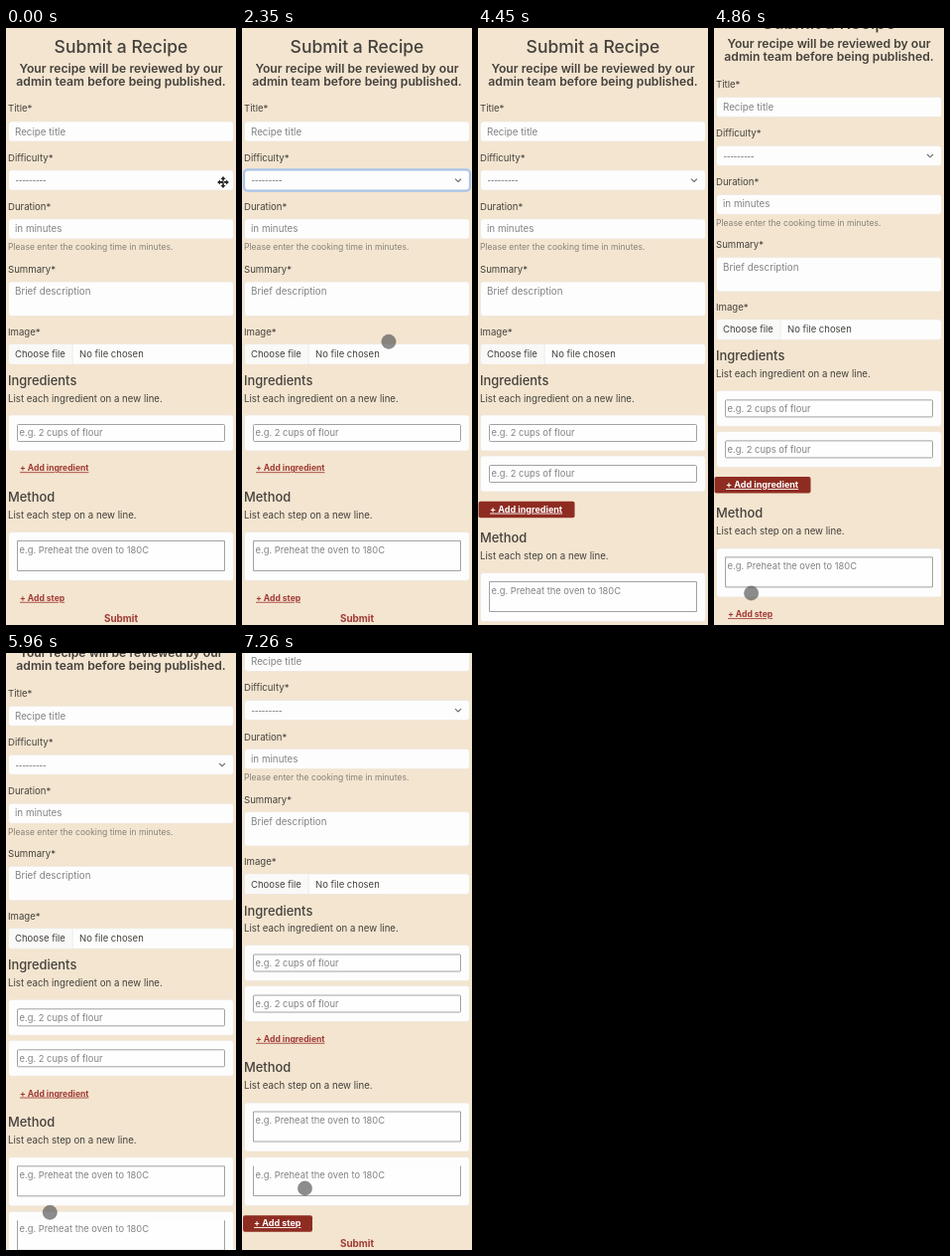
Recreate the animation shown at these times as an HTML page. Size 232 px wide and 600 px high, loop 7360 ms.

```html
<!DOCTYPE html>
<html lang="en">
<head>
<meta charset="utf-8">
<title>Submit a Recipe</title>
<style>
  html, body { margin: 0; width: 100%; height: 100%; overflow: hidden; background: #f3e5d0; }
  svg { display: block; width: 232px; height: 600px; }
  text { font-family: Inter, "Open Sans", sans-serif; fill: #45413c; white-space: pre; }
  .title { font-size: 17.5px; font-weight: 550; text-anchor: middle; }
  .lead { font-size: 12.2px; font-weight: 600; text-anchor: middle; }
  .section { font-size: 12.9px; font-weight: 550; }
  .label { font-size: 9.6px; }
  .body { font-size: 9.7px; }
  .value { font-size: 9.5px; }
  .hint { font-size: 9.8px; fill: #828385; }
  .example { font-size: 9.4px; fill: #828385; }
  .help { font-size: 8.57px; fill: #868077; }
  .dashes { font-family: "Open Sans", sans-serif; font-size: 10.7px; fill: #77797c; }
  .link { font-size: 8.55px; font-weight: 700; fill: #a03a34; text-decoration: underline; }
  .hot { font-size: 9px; font-weight: 700; fill: #fff; text-decoration: underline; }
  .submit { font-size: 9.9px; font-weight: 700; fill: #a03a34; text-anchor: middle; }
  .option { font-size: 6.4px; font-weight: 600; fill: #45423f; }
</style>
</head>
<body>
<svg id="stage" viewBox="0 0 232 600"></svg>
<script>
const LOOP = 7360;
const CARD_GAP = 41, STEP_GAP = 54.5;
const BLUR_AT = 3800, ADD_ITEM_AT = 3820, ADD_STEP_AT = 5700;
const MENU_OPEN = 900, MENU_CLOSE = 1700;

const text = (cls, x, y, value) => `<text class="${cls}" x="${x}" y="${y}">${value}</text>`;
const box = (x, y, w, h, attrs) => `<rect x="${x}" y="${y}" width="${w}" height="${h}" ${attrs}/>`;
const field = (y, h) => box(2.5, y, 227, h, 'rx="3" fill="#fdfdfd" stroke="#ece5da" stroke-width=".7"');
const group = (id, content) => `<g id="${id}">${content}</g>`;
const outlineStyle = 'fill="#fefefe" stroke="#98989a" stroke-width=".9"';

const itemCard = y => field(y, 36)
  + box(11.5, y + 9.5, 209, 17, `rx="1" ${outlineStyle}`)
  + text('example', 13.5, y + 21.3, 'e.g. 2 cups of flour');

function stepCard(y, open) {
  const top = y + 9, bottom = y + 39;
  const outline = `M11.5 ${top}V${bottom}H220.5V${top}${open ? '' : 'Z'}`;
  return field(y, 49)
    + `<path d="${outline}" ${outlineStyle}/>`
    + text('example', 13.5, y + 21, 'e.g. Preheat the oven to 180C');
}

const addLink = (id, label, y, x, w) =>
  group(id + 'Plain', text('link', 14, y + 2.8, label))
  + group(id + 'Hot', box(x, y - 7.8, w, 16.5, 'rx="2" fill="#8f2c22"') + text('hot', 12, y + 3.1, label));

const header = text('title', 116, 25.2, 'Submit a Recipe')
  + text('lead', 116, 44.6, 'Your recipe will be reviewed by our')
  + text('lead', 116, 58, 'admin team before being published.');

const details = text('label', 2, 84.3, 'Title*') + field(94, 20) + text('hint', 9, 107.5, 'Recipe title')
  + text('label', 2, 133.7, 'Difficulty*') + field(143, 20)
  + box(2, 142.4, 228, 21.2, 'id="ring" rx="3.5" fill="none" stroke="#a9c5ea" stroke-width="2.2"')
  + text('dashes', 9.5, 156.3, '---------')
  + '<path id="chevron" d="M215 151.6l3 2.8l3-2.8" fill="none" stroke="#66696e" stroke-width="1.1"/>'
  + text('label', 2, 183, 'Duration*') + field(192, 20) + text('hint', 9, 205, 'in minutes')
  + text('help', 2, 223.3, 'Please enter the cooking time in minutes.')
  + text('label', 2, 246.1, 'Summary*') + field(255, 34.5) + text('hint', 9, 268.2, 'Brief description')
  + text('label', 2, 308.5, 'Image*') + field(317.5, 20.5)
  + box(3, 318, 64, 19.5, 'rx="2.5" fill="#f9f9f8"') + box(66.7, 318, .7, 19.5, 'fill="#e6e4e1"')
  + text('value', 9, 331, 'Choose file') + text('value', 74, 331, 'No file chosen');

const ingredients = text('section', 2, 359.1, 'Ingredients')
  + text('body', 2, 375.6, 'List each ingredient on a new line.')
  + itemCard(389) + group('newItem', itemCard(389 + CARD_GAP));

const method = addLink('item', '+ Add ingredient', 442.5, .5, 97)
  + text('section', 2, 475.8, 'Method')
  + text('body', 2, 492.8, 'List each step on a new line.')
  + stepCard(506.5, false) + group('newStep', stepCard(506.5 + STEP_GAP, true));

const footer = addLink('step', '+ Add step', 573, 1, 70) + text('submit', 116, 596.8, 'Submit');

const menu = box(-8, 63, 158, 76, 'rx="5" fill="#6b5a40" opacity=".4" filter="url(#soft)"')
  + box(-8, 60.5, 156.5, 76, 'rx="4" fill="url(#glass)" stroke="#cfc8be" stroke-width=".6"')
  + box(-8, 64, 153, 17.5, 'rx="3" fill="url(#blue)"')
  + '<path d="M0 73l2 2.6l4-6" fill="none" stroke="#fff" stroke-width="1.3"/>'
  + '<path d="M11.5 71h24" stroke="#fff" stroke-width=".8" stroke-dasharray="1.8 .9" opacity=".8"/>'
  + ['Easy peasy', 'Medium rare', 'Hard boiled'].map((name, i) => text('option', 11, 89.2 + 17.2 * i, name)).join('');

const arrows = [0, 90, 180, 270].map(a =>
  `<path transform="rotate(${a})" d="M-.9 0V-3H-2.6L0-6L2.6-3H.9V0Z"/>`).join('');

const gradient = (id, attrs, from, to) =>
  `<linearGradient id="${id}" ${attrs}><stop stop-color="${from}"/><stop offset="1" stop-color="${to}"/></linearGradient>`;
const defs = '<defs><filter id="soft" x="-20%" y="-20%" width="140%" height="150%"><feGaussianBlur stdDeviation="4"/></filter>'
  + gradient('glass', 'x2="1" y2="1"', '#e6dfd5', '#dfdddb')
  + gradient('blue', 'x2="0" y2="1"', '#4a9ff8', '#1f82f2') + '</defs>';

const stage = document.getElementById('stage');
stage.innerHTML = defs
  + box(0, 0, 232, 600, 'fill="#f3e5d0"')
  + group('page', header + details + ingredients + group('methodPart', method) + group('footerPart', footer))
  + group('menu', menu)
  + `<g id="mover" transform="translate(219 155)" fill="#26282c" stroke="#fff" stroke-width=".8" paint-order="stroke">${arrows}</g>`
  + '<circle id="touch" r="7.2" fill="#555" fill-opacity=".68" stroke="#555" stroke-opacity=".35" stroke-width=".8"/>';

const part = Object.fromEntries([...stage.querySelectorAll('[id]')].map(el => [el.id, el]));

// Touch path: time, x, y
const path = [
  [0, 220.5, 150.5], [1720, 220.5, 150.5], [2340, 149, 314], [3000, 49.5, 438], [3900, 49.5, 439],
  [4380, 38, 610], [4640, 37, 610], [4720, 37, 594], [4960, 38, 551], [5200, 38, 551],
  [5480, 37, 573], [5800, 37, 573], [6200, 56, 545], [6480, 58, 544.5], [6580, 59, 530],
  [6820, 62, 489], [6900, 62, 489], [7200, 63.5, 538], [LOOP, 63.5, 538]
];
const scrolls = [[0, 0], [4720, 0], [4960, 40.7], [6480, 40.7], [6580, 55], [6820, 95.5], [LOOP, 95.5]];

const clamp = v => Math.min(1, Math.max(0, v));
const fade = (t, start, length) => clamp((t - start) / length);

function sample(keys, t) {
  const i = Math.max(1, keys.findIndex(k => k[0] >= t));
  const a = keys[i - 1], b = keys[i];
  const p = clamp((t - a[0]) / (b[0] - a[0]));
  const e = p * p * (3 - 2 * p) * .4 + p * .6;
  return a.slice(1).map((v, n) => v + (b[n + 1] - v) * e);
}

const show = (el, opacity) => el.setAttribute('opacity', opacity);
const move = (el, x, y) => el.setAttribute('transform', `translate(${x} ${y})`);

function setHot(name, amount) {
  show(part[name + 'Plain'], 1 - amount);
  show(part[name + 'Hot'], amount);
}

function render(t) {
  const hasItem = t >= ADD_ITEM_AT, hasStep = t >= ADD_STEP_AT;
  const [scroll] = sample(scrolls, t);
  move(part.page, 0, -scroll);
  move(part.methodPart, 0, hasItem ? CARD_GAP : 0);
  move(part.footerPart, 0, (hasItem ? CARD_GAP : 0) + (hasStep ? STEP_GAP : 0));
  show(part.newItem, +hasItem);
  show(part.newStep, +hasStep);
  show(part.ring, fade(t, MENU_OPEN - 40, 120) * (1 - fade(t, BLUR_AT, 120)));
  show(part.menu, t < MENU_OPEN ? 0 : 1 - fade(t, MENU_CLOSE, 150));
  setHot('item', fade(t, ADD_ITEM_AT, 150) * (1 - fade(t, ADD_STEP_AT, 150)));
  setHot('step', fade(t, ADD_STEP_AT, 150));

  const onMover = t < 40;
  show(part.mover, +onMover);
  show(part.chevron, +!onMover);
  show(part.touch, +!onMover);
  move(part.touch, ...sample(path, t));
}

const start = performance.now();
function tick() {
  render((performance.now() - start) % LOOP);
  requestAnimationFrame(tick);
}
render(0);
requestAnimationFrame(tick);
</script>
</body>
</html>
```
